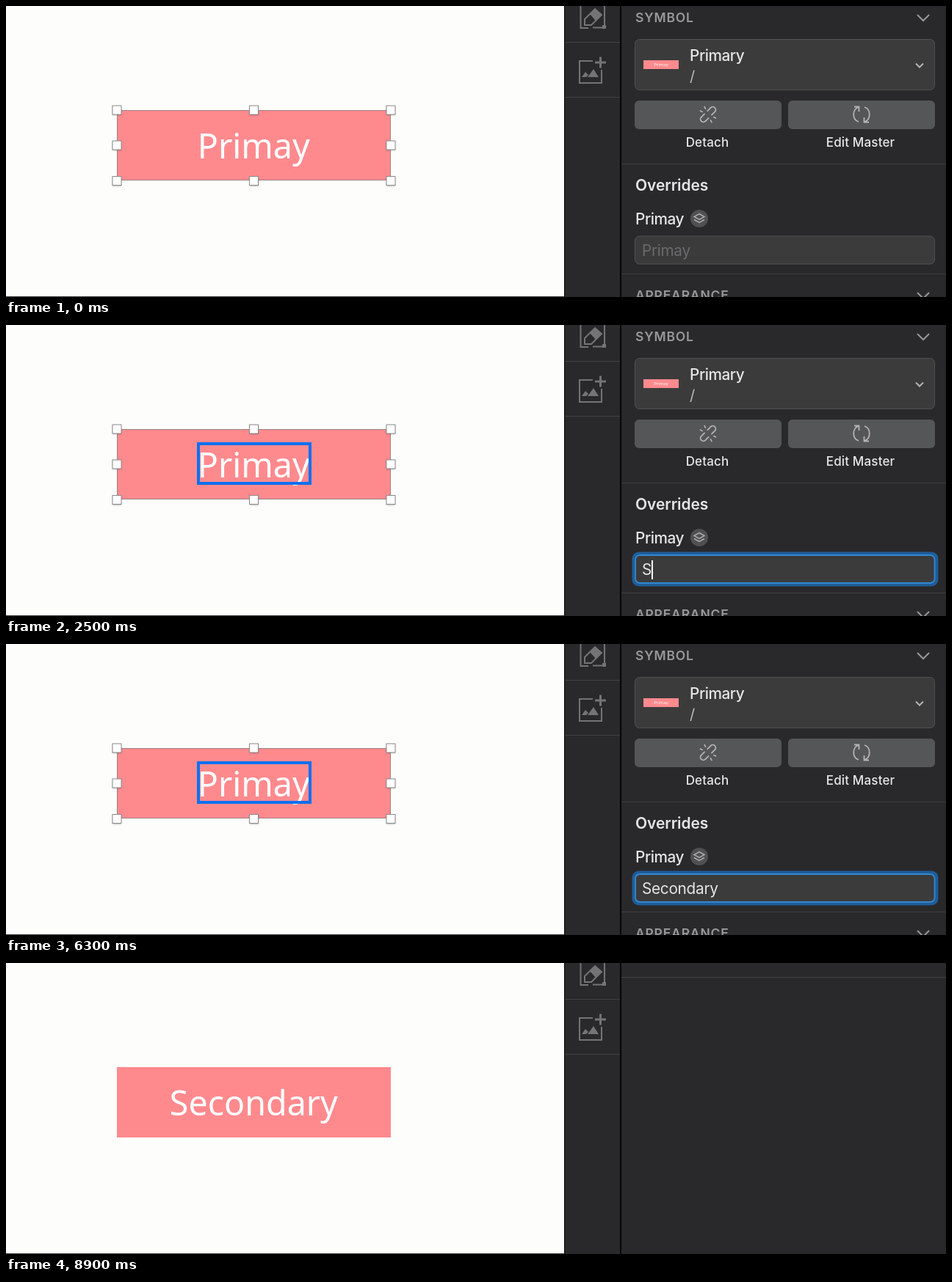
Recreate the animation shown at these times as an HTML page with a canvas. Size 1280 px wide and 397 px high, loop 9 s.

```html
<!DOCTYPE html>
<html lang="en">
<head>
<meta charset="utf-8">
<title>Symbol override</title>
<style>
  html, body { margin: 0; width: 100%; height: 100%; overflow: hidden; background: #29292b; }
  canvas { display: block; width: 1280px; height: 397px; }
</style>
</head>
<body>
<canvas id="stage" width="1280" height="397"></canvas>
<script>
const ctx = document.getElementById('stage').getContext('2d');
const LOOP = 9000, STEP = 100;
const UI = 'Inter, sans-serif', LABEL = '"Noto Sans", sans-serif';
const PINK = '#ff8a8e', PANEL = '#29292b', FIELD = '#3b3b3c', BUTTON = '#555657';
const ICON = '#747476', PALE = '#e6e6e7', MUTED = '#98989b';

// Timeline in ms
const ENTER = 400, HOVER = 700, CLICK = 900, RING = 1000, TYPE = 2400, KEY = 250;
const COMMIT = 6500, DESELECT = 8500;
const WORD = 'Secondary';

const clamp = v => Math.max(0, Math.min(1, v));
const easeOut = p => 1 - (1 - p) ** 3;

function rect(x, y, w, h, fill) {
  ctx.fillStyle = fill;
  ctx.fillRect(x, y, w, h);
}

function box(x, y, w, h, r, fill, stroke, width = 1) {
  ctx.beginPath();
  ctx.roundRect(x, y, w, h, r);
  if (fill) { ctx.fillStyle = fill; ctx.fill(); }
  if (stroke) { ctx.strokeStyle = stroke; ctx.lineWidth = width; ctx.stroke(); }
}

function text(str, x, y, size, color, { weight = 400, spacing = 0, align = 'left', family = UI } = {}) {
  ctx.font = `${weight} ${size}px ${family}`;
  ctx.letterSpacing = spacing + 'px';
  ctx.textAlign = align;
  ctx.fillStyle = color;
  ctx.fillText(str, x, y);
}

function path(d, color, width = 2, fill) {
  const p = new Path2D(d);
  if (fill) { ctx.fillStyle = fill; ctx.fill(p); }
  if (color) { ctx.strokeStyle = color; ctx.lineWidth = width; ctx.stroke(p); }
}

function at(x, y, draw) {
  ctx.save();
  ctx.translate(x, y);
  draw();
  ctx.restore();
}

const chevron = (x, y, s, color) =>
  at(x, y, () => path(`M${-s} ${-s / 2}L0 ${s / 2}L${s} ${-s / 2}`, color, 2));

function drawToolbar() {
  rect(760, 0, 520, 397, PANEL);
  rect(760, 0, 1, 397, '#050505');
  rect(836, 0, 2, 397, '#050505');
  rect(761, 49, 75, 1, '#424245');
  rect(761, 124, 75, 1, '#424245');

  path('M782.5 0V30H793M799 29.5H814M815 0V26', ICON, 2);
  rect(812, 26, 5, 5, ICON);
  path('M788 26V18L802 4L811 12L797 26Z', ICON, 2);
  path('M795 11L802 4L811 12L803 20Z', null, 0, ICON);

  path('M799 75H781V105H811V87', ICON, 2);
  path('M802 77H817M809.5 69.5V84.5', ICON, 3);
  path('M784 97L789 90L793 94L790 97ZM792 97L800 86L807 97Z', null, 0, ICON);
}

function drawArtwork(t, selected) {
  rect(0, 0, 760, 397, '#fdfdfc');
  rect(151, 142, 373, 96, PINK);
  text(t < COMMIT ? 'Primay' : WORD, 337.3, 208, 46.6, '#fff', { align: 'center', family: LABEL });
  if (t >= HOVER && t < COMMIT) {
    ctx.strokeStyle = '#0a70f2';
    ctx.lineWidth = 4;
    ctx.strokeRect(262, 162, 152, 54);
  }
  if (selected) drawHandles();
  rect(0, 396, 760, 1, '#3a3a3a');
}

function drawHandles() {
  ctx.strokeStyle = '#9b8283';
  ctx.lineWidth = 1;
  ctx.strokeRect(151.5, 142.5, 372, 95);
  for (const x of [151, 337.5, 524]) {
    for (const y of [142, 190, 238.5]) {
      if (x === 337.5 && y === 190) continue;
      ctx.save();
      ctx.shadowColor = 'rgba(0,0,0,.25)';
      ctx.shadowBlur = 2;
      ctx.shadowOffsetY = 1;
      rect(x - 6, y - 6, 12, 12, '#fff');
      ctx.restore();
      ctx.strokeStyle = '#8a8a8a';
      ctx.strokeRect(x - 6, y - 6, 12, 12);
    }
  }
}

function drawDetachIcon() {
  at(956, 148, () => {
    ctx.lineCap = 'round';
    ctx.rotate(-Math.PI / 4);
    path('M-3 -4H-9A4 4 0 0 0 -9 4H-3M3 -4H9A4 4 0 0 1 9 4H3', '#b4b4b6', 1.8);
    path('M-3 -8L-4 -11M3 8L4 11M3 -8L4 -11M-3 8L-4 11', '#b4b4b6', 1.6);
  });
}

function drawCycleIcon() {
  at(1165, 148, () => {
    for (let i = 0; i < 2; i++) {
      path('M-4 10C-13 7 -13 -7 -4 -10M-10 -10.5H-3.5V-4', '#b4b4b6', 1.8);
      ctx.rotate(Math.PI);
    }
  });
}

function drawReset() {
  at(1249, 244, () => {
    ctx.beginPath();
    ctx.arc(0, 0, 11.5, Math.PI, Math.PI * 2.78);
    ctx.strokeStyle = MUTED;
    ctx.lineWidth = 1.8;
    ctx.stroke();
    path('M-15.5 -3.5L-11.5 1L-7 -3', MUTED, 1.8);
  });
}

function drawInspector(t) {
  const heading = { weight: 600, spacing: 0.8 };
  text('SYMBOL', 857, 22, 17.5, MUTED, heading);
  chevron(1249, 16, 8, MUTED);

  box(856.5, 45.5, 408, 69, 6, FIELD, '#515153');
  rect(868, 74, 48, 12, PINK);
  text('Primay', 892, 82, 6, '#fff', { align: 'center', family: LABEL });
  text('Primary', 931, 74.5, 20.8, PALE, { weight: 500, spacing: -0.45 });
  text('/', 931, 103, 20, '#bcbcbe');
  chevron(1244, 81, 5, '#b4b4b6');

  box(856, 129, 200, 39, 6, BUTTON);
  box(1065, 129, 200, 39, 6, BUTTON);
  drawDetachIcon();
  drawCycleIcon();
  const caption = { weight: 500, spacing: 0.15, align: 'center' };
  text('Detach', 955, 192, 17, PALE, caption);
  text('Edit Master', 1163.5, 192, 17, PALE, caption);

  rect(838, 215, 442, 1, '#3e3e41');
  text('Overrides', 857, 251.5, 21, PALE, { weight: 600, spacing: -0.1 });
  if (t >= COMMIT) drawReset();

  text('Primay', 857, 298, 20.8, PALE, { weight: 500, spacing: -0.45 });
  box(932, 278, 24, 24, 12, '#505052');
  path('M944 283.5L951 287.5L944 291.5L937 287.5Z', '#acacae', 1.5);
  path('M937 291.5L944 295.5L951 291.5', '#acacae', 1.5);

  drawInput(t);
  rect(838, 365, 442, 1, '#3e3e41');
  text('APPEARANCE', 857, 401, 17.5, MUTED, heading);
  chevron(1249, 395, 8, MUTED);
}

function drawInput(t) {
  const ring = clamp((t - RING + STEP) / 300);
  const count = t < TYPE ? 0 : Math.min(WORD.length, Math.floor((t - TYPE) / KEY) + 1);
  const typed = WORD.slice(0, count);

  if (t >= RING) {
    ctx.globalAlpha = ring;
    box(852.5, 309.5, 417, 47, 9, '#205c98');
    ctx.globalAlpha = 1;
  }
  box(856.5, 314, 408, 38, 6, FIELD, '#515153');
  if (t >= RING) {
    ctx.globalAlpha = ring;
    box(857, 314, 407.5, 38, 6, null, '#3189d2', 1.8);
    ctx.globalAlpha = 1;
  }

  text(typed || 'Primay', 866, 341, 20.8, typed ? PALE : '#6a6a6c', { spacing: -0.3 });

  // The caret blinks from the latest click or keystroke
  let since = CLICK;
  if (t >= COMMIT) since = COMMIT;
  else if (count) since = TYPE + (count - 1) * KEY;
  if (t >= CLICK && (t - since) % 1000 < 500) {
    const width = typed ? ctx.measureText(typed).width : 0;
    rect(Math.round(866 + width), 321, 2, 26, '#fff');
  }
}

function drawPointer(t) {
  if (t < ENTER || t >= TYPE) return;
  const p = easeOut(clamp((t - ENTER) / 400));
  at(964.5 + 30 * (1 - p), 336.5 + 80 * (1 - p), () => {
    ctx.lineCap = 'round';
    ctx.lineJoin = 'round';
    const beam = 'M-6 -13C-2 -13 0 -11 0 -8C0 -11 2 -13 6 -13M0 -8V8M-6 13C-2 13 0 11 0 8C0 11 2 13 6 13M-3 3H3';
    path(beam, '#fff', 5.5);
    path(beam, '#1b1b1b', 2);
  });
}

function draw(t) {
  const selected = t < DESELECT;
  drawArtwork(t, selected);
  drawToolbar();
  if (selected) drawInspector(t);
  else rect(838, 19, 442, 1, '#424245');
  drawPointer(t);
}

const start = performance.now();
function tick() {
  const t = (performance.now() - start) % LOOP;
  draw(Math.floor(t / STEP) * STEP);
  requestAnimationFrame(tick);
}
tick();
</script>
</body>
</html>
```
